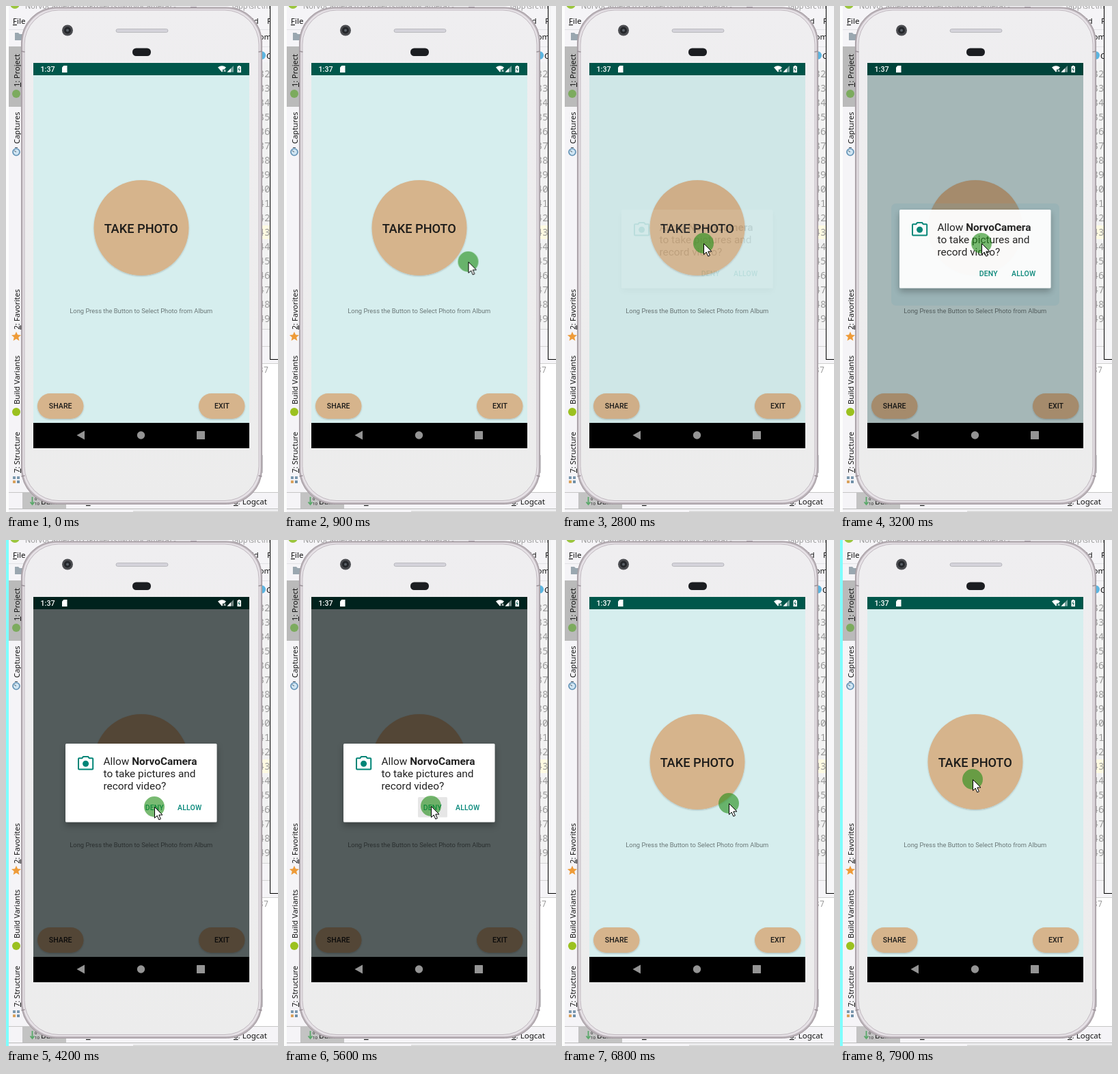
Animation of 398 by 738 pixels, one loop 8000 ms. Source, as an HTML page:

```html
<!DOCTYPE html>
<html lang="en">
<head>
<meta charset="utf-8">
<title>Permission dialog</title>
<style>
html, body { margin: 0; width: 100%; height: 100%; overflow: hidden; background: #fff; }
svg { display: block; width: 398px; height: 738px; }
.ide text { font: 11px "Noto Sans", sans-serif; fill: #111; }
.ide .menu { font-size: 11.5px; }
.ide .faint { fill: #999; }
.ide .num { font: 14px "Noto Sans Mono", monospace; fill: #9a9a9a; }
.ide .small { font-size: 12px; }
.ide .tiny { font-size: 6px; }
.u { text-decoration: underline; }
.app text { font-family: Roboto, sans-serif; }
.caps { font-weight: 500; font-size: 10.6px; fill: #1d1c1a; text-anchor: middle; }
.app .big { font-size: 18.2px; }
.msg { font-size: 15.4px; fill: #212121; }
.msg tspan { font-weight: 700; }
.action { font-weight: 500; font-size: 10.5px; letter-spacing: .15px; fill: #008577; }

.strip, .ripple, .dim, .dialog, .halo, .press, .cursor {
  animation: 8s step-end -10ms infinite;
}
.strip { animation-name: blink; animation-duration: .4s; }
.ripple { animation-name: ripple; }
.dim { animation-name: dim; }
.dialog { animation-name: dialog; }
.halo { animation-name: halo; }
.press { animation-name: press; }
.cursor { animation-name: move; }

@keyframes blink { 0% { fill: #fdfdfd; } 50%, 100% { fill: #7ffdfd; } }
@keyframes ripple {
  0% { opacity: 0; }
  18.75% { opacity: .04; }
  20% { opacity: .08; }
  22.5%, 100% { opacity: 0; }
}
@keyframes dim {
  0% { opacity: 0; }
  35% { opacity: .03; }
  37.5% { opacity: .1; }
  40% { opacity: .23; }
  41.25% { opacity: .34; }
  42.5% { opacity: .45; }
  43.75% { opacity: .54; }
  45% { opacity: .61; }
  72.5% { opacity: .25; }
  75%, 100% { opacity: 0; }
}
@keyframes dialog {
  0% { opacity: 0; }
  35% { opacity: .1; }
  37.5% { opacity: .5; }
  40% { opacity: .95; }
  41.25% { opacity: 1; }
  72.5% { opacity: .3; }
  75%, 100% { opacity: 0; }
}
@keyframes halo {
  0% { opacity: 0; }
  37.5% { opacity: .6; }
  40% { opacity: 1; }
  41.25% { opacity: .6; }
  42.5% { opacity: .3; }
  43.75%, 100% { opacity: 0; }
}
@keyframes press {
  0% { opacity: 0; }
  65% { opacity: .3; }
  66.25% { opacity: .5; }
  67.5% { opacity: .7; }
  68.75% { opacity: .85; }
  70% { opacity: 1; }
  75%, 100% { opacity: 0; }
}
@keyframes move {
  0% { transform: translate(420px, 400px); }
  2.5% { transform: translate(420px, 400px); animation-timing-function: steps(8); }
  12.5% { transform: translate(248px, 369px); animation-timing-function: steps(6); }
  20% { transform: translate(207px, 346px); }
  43.75% { transform: translate(207px, 346px); animation-timing-function: steps(5); }
  50% { transform: translate(226px, 381px); animation-timing-function: steps(2); }
  52.5% { transform: translate(217px, 389px); animation-timing-function: steps(6); }
  60% { transform: translate(215px, 388px); }
  78.75% { transform: translate(215px, 388px); animation-timing-function: steps(5); }
  85% { transform: translate(244px, 384px); animation-timing-function: steps(4); }
  90% { transform: translate(210px, 362px); animation-timing-function: steps(7); }
  98.75%, 100% { transform: translate(194px, 349px); }
}
</style>
</head>
<body>
<svg viewBox="0 0 398 738">
  <defs>
    <filter id="soft" x="-20%" y="-20%" width="140%" height="150%">
      <feDropShadow dx="0" dy="1" stdDeviation=".9" flood-opacity=".22"/>
    </filter>
    <filter id="deep" x="-20%" y="-20%" width="140%" height="150%">
      <feDropShadow dx="0" dy="5" stdDeviation="5" flood-opacity=".28"/>
    </filter>
    <linearGradient id="body" x2="0" y2="1">
      <stop offset="0" stop-color="#efeef0"/>
      <stop offset="1" stop-color="#ececec"/>
    </linearGradient>
  </defs>

  <g class="ide">
    <rect width="398" height="738" fill="#f5f4f7"/>
    <circle cx="13" cy="-3" r="7" fill="#9bc53d"/>
    <text class="faint" x="28" y="4">NorvoCamera [D:\Projects\NorvoCamera] - ...</text>
    <text class="faint" x="321" y="4">...\app\src\main</text>
    <text class="menu" x="10" y="26"><tspan class="u">F</tspan>ile</text>
    <text class="menu" x="342" y="26">Build</text>
    <text class="menu" x="382" y="26">F</text>
    <path d="M4 34.5H398M4 59.5H398" stroke="#e2e2e5"/>
    <path d="M13 39h5l2 2h6v9H13z" fill="#9aa7b0"/>
    <text class="menu" x="365" y="49">com</text>
    <circle cx="374" cy="72" r="6" fill="#5bb5e0"/>
    <text class="menu" x="381" y="77">C</text>

    <rect x="4" y="59" width="20" height="88" fill="#bababa"/>
    <text transform="translate(20 118) rotate(-90)"><tspan class="u">1</tspan>: Project</text>
    <circle cx="15" cy="128" r="6" fill="#7cab5e"/>
    <text transform="translate(20 201) rotate(-90)">Captures</text>
    <circle cx="15" cy="213" r="5" fill="#cfe4f2" stroke="#5d8fb3" stroke-width="1.6"/>
    <path d="M15 213l-3-2M13 206.500h4" stroke="#55606a" fill="none"/>
    <text transform="translate(20 472) rotate(-90)"><tspan class="u">2</tspan>: Favorites</text>
    <path d="M15 475l2 4.600 5 .4-3.800 3.300 1.200 5-4.400-2.700-4.400 2.700 1.200-5L8 480l5-.4z" fill="#ee9b38"/>
    <text transform="translate(20 581) rotate(-90)">Build Variants</text>
    <circle cx="15" cy="592" r="6" fill="#9bc11f"/>
    <text transform="translate(20 681) rotate(-90)"><tspan class="u">7</tspan>: Structure</text>
    <path d="M10 686h4v4h-4zM16 686h4v4h-4z" fill="#7c98ae"/>
    <path d="M10 692h4v4h-4z" fill="#d9a25c"/>
    <path d="M16 692h4v4h-4z" fill="#6f8fa8"/>

    <rect x="360" y="82" width="38" height="390" fill="#f2f2f2"/>
    <rect x="360" y="320" width="38" height="20" fill="#fffbe2"/>
    <g id="lines"></g>
    <path d="M360 471.500H398M360 496.500H398" stroke="#d4d4d4"/>
    <rect x="360" y="522" width="38" height="188" fill="#fff"/>
    <path d="M360 521.500H398" stroke="#d0d0d0"/>
    <text class="num small" x="369.500" y="535">37</text>
    <rect x="370" y="655" width="6" height="26" fill="#d2d2d4"/>
    <rect x="386.500" y="-1" width="14" height="516.500" fill="#f7f7f9" stroke="#000"/>

    <path d="M4 709.500H398" stroke="#c6c6c6"/>
    <rect x="24" y="710" width="64" height="24" fill="#c3c3c3"/>
    <path d="M38.500 716v11m-3-3.500l3 3.500 3-3.500" fill="none" stroke="#59a869" stroke-width="1.800"/>
    <text class="tiny" x="42" y="721">0</text>
    <text class="tiny" x="42" y="728">10</text>
    <text class="menu" x="51" y="727">Build</text>
    <text class="menu" x="117" y="727"><tspan class="u">9</tspan>: Terminal</text>
    <text class="menu" x="333" y="727"><tspan class="u">6</tspan>: Logcat</text>
    <path d="M4 733.500H398" stroke="#b9b9b9"/>
    <rect x="186" y="736" width="212" height="2" fill="#dedede"/>
  </g>
  <rect class="strip" width="4" height="738"/>

  <g>
    <rect x="270" y="1" width="9" height="4" fill="#857a86"/>
    <rect x="22.500" y="2" width="352" height="724.500" rx="51" fill="#bab2b8" stroke="#a39aa0"/>
    <rect x="24.500" y="4" width="348" height="720" rx="50" fill="#e6e1e6"/>
    <rect x="27" y="6" width="343" height="715.500" rx="50" fill="url(#body)" stroke="#c0b8bf"/>
    <path d="M22.500 66l5 1M374.500 66l-5 1M22.500 686l5-1M374.500 686l-5-1" stroke="#9a9197" stroke-width="1.500"/>
    <circle cx="90" cy="35.500" r="8" fill="#4b4c50"/>
    <circle cx="90" cy="35.500" r="5" fill="#24262a"/>
    <circle cx="90" cy="35.500" r="2" fill="#5a6068"/>
    <rect x="161" y="33.500" width="76" height="5" rx="2.500" fill="#d4d3da" stroke="#b2b1b6" stroke-width=".8"/>
    <rect x="185" y="61.500" width="27" height="11.500" rx="5.500" fill="#1b1d21"/>
  </g>

  <g class="app">
    <rect x="40" y="83" width="316" height="525" fill="#d6eeee"/>
    <rect x="40" y="83" width="316" height="18" fill="#00574b"/>
    <circle cx="198" cy="323.500" r="69.500" fill="#d6b48c" filter="url(#soft)"/>
    <circle class="ripple" cx="198" cy="323.500" r="69.500"/>
    <text class="caps big" x="197.700" y="330.800">TAKE PHOTO</text>
    <text x="93.300" y="447.500" font-size="9.350" fill="#6a7777">Long Press the Button to Select Photo from Album</text>
    <g fill="#d6b48c" filter="url(#soft)">
      <rect x="46" y="565" width="67.500" height="37" rx="18.500"/>
      <rect x="282" y="565" width="67.500" height="37" rx="18.500"/>
    </g>
    <text class="caps" x="79.700" y="587.300">SHARE</text>
    <text class="caps" x="316" y="587.300">EXIT</text>

    <rect class="dim" x="40" y="83" width="316" height="525"/>
    <rect class="halo" x="75" y="288" width="246" height="149" rx="7" fill="#6fa6b4" fill-opacity=".2"/>

    <g fill="#fff">
      <text x="50.500" y="96" font-size="10.700" font-weight="500">1:37</text>
      <path d="M84.500 87h5v10h-7.500v-7.500z"/>
      <path d="M310 89.500q6-4.500 12 0l-2.500 3H317v3l-1 1z"/>
      <path d="M318.500 93l3 3m0-3l-3 3" stroke="#fff"/>
      <path d="M333 87v9.500h-9.500z" fill-opacity=".45"/>
      <path d="M329 91v5.500h-5.500z"/>
      <path d="M340 87h2.500v1h1.500v9h-5.500v-9h1.500z"/>
    </g>
    <path d="M341.700 89.500l-1.700 3h2.300l-1.500 3" fill="none" stroke="#00574b" stroke-width=".9"/>

    <rect x="40" y="608" width="316" height="37" fill="#000"/>
    <g fill="#949494">
      <path d="M115 619.500v13l-11.500-6.500z"/>
      <circle cx="197.500" cy="626" r="5.700"/>
      <rect x="279" y="620" width="12" height="12" rx=".6"/>
    </g>

    <g class="dialog">
      <rect x="87" y="297" width="221.500" height="114.500" rx="1.500" fill="#fff" filter="url(#deep)"/>
      <path d="M106 319.200q0-1 1-1h4.300l1.800-2.200h7l1.800 2.200h4.300q1 0 1 1v14.300q0 1-1 1h-19.200q-1 0-1-1z"
        fill="none" stroke="#008577" stroke-width="2"/>
      <circle cx="116.600" cy="326.300" r="4.500" fill="#008577"/>
      <text class="msg" x="142.500" y="327.500">Allow <tspan>NorvoCamera</tspan></text>
      <text class="msg" x="142.500" y="345.700">to take pictures and</text>
      <text class="msg" x="142.500" y="363.800">record video?</text>
      <rect class="press" x="196" y="375" width="43" height="29.500" rx="1.500" fill="#e6e6e6"/>
      <text class="action" x="203.700" y="393.800">DENY</text>
      <text class="action" x="251" y="393.800">ALLOW</text>
    </g>
  </g>

  <g class="cursor">
    <circle r="15" fill="#1e8c14" fill-opacity=".6"/>
    <path d="M.5 .5v16l3.700-3.500 2.600 6 2.600-1.100-2.600-5.900h5.200z" fill="#fff" stroke="#000"/>
  </g>
</svg>
<script>
const lines = document.getElementById("lines");
for (let n = 32; n < 50; n++) {
  const t = document.createElementNS("http://www.w3.org/2000/svg", "text");
  t.setAttribute("class", "num");
  t.setAttribute("x", 369.5);
  t.setAttribute("y", 104 + (n - 32) * 21);
  t.textContent = n;
  lines.append(t);
}
</script>
</body>
</html>
```
